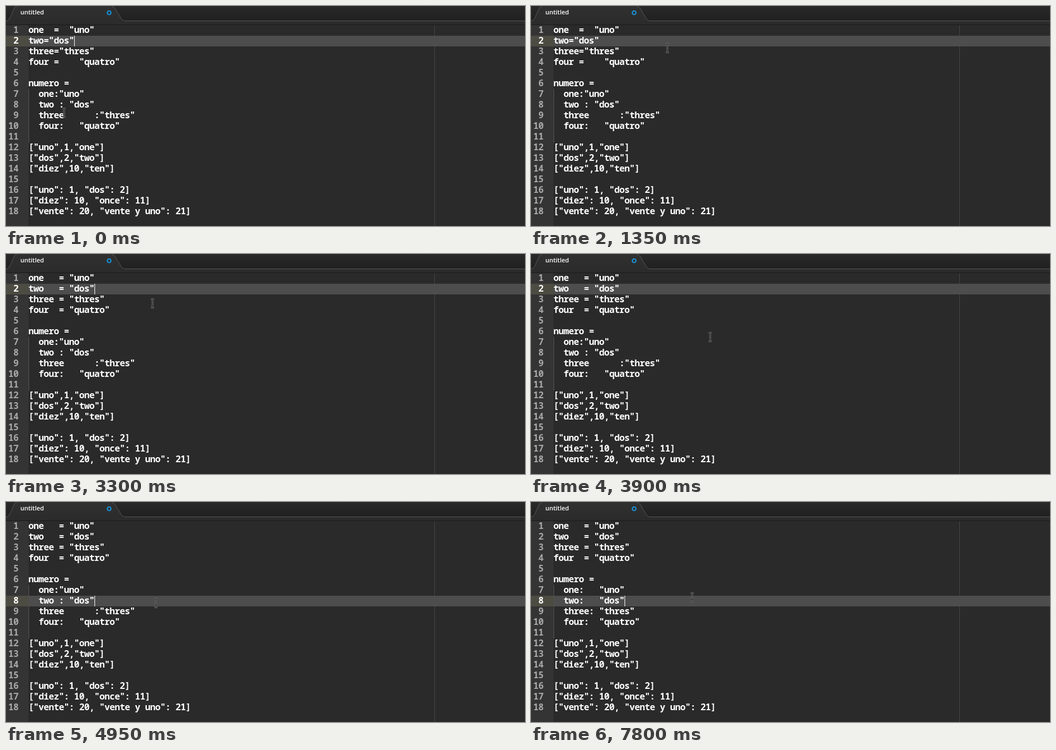
An HTML page for the animation above (8000 ms loop, 921 by 392 pixels).

```html
<!DOCTYPE html>
<html lang="en">
<head>
<meta charset="utf-8">
<title>Align editor</title>
<style>
  html, body { margin: 0; height: 100%; overflow: hidden; background: #2a2a2a; }
  svg { display: block; width: 921px; height: 392px; }
  text { font: 600 16px "Noto Sans Mono", "DejaVu Sans Mono", monospace; letter-spacing: -.6px; fill: #fff; white-space: pre; font-variant-ligatures: none; }
  .num { fill: #a8a8a8; text-anchor: end; }
  .num.on { fill: #fff; }
  .tab { font: 600 11px "Open Sans", "Lato", sans-serif; letter-spacing: 0; }
</style>
</head>
<body>
<svg viewBox="0 0 921 392">
  <defs>
    <linearGradient id="bar" x2="0" y2="1">
      <stop offset="0" stop-color="#292929"/><stop offset="1" stop-color="#202020"/>
    </linearGradient>
    <linearGradient id="face" x2="0" y2="1">
      <stop offset="0" stop-color="#303030"/><stop offset="1" stop-color="#2b2b2b"/>
    </linearGradient>
    <path id="beam" d="M-3 -7.5H-2Q0 -7.5 0 -5.5Q0 -7.5 2 -7.5H3M0 -5.5V5.5M-3 7.5H-2Q0 7.5 0 5.5Q0 7.5 2 7.5H3M-2 3.5H2"/>
  </defs>
  <rect width="921" height="27" fill="url(#bar)"/>
  <path d="M0 33V26.5H1Q5 26 7 21L14 5Q16 0 20 0H187Q191 0 194 5L203 20Q206 26.5 212 26.5H921V33Z" fill="url(#face)"/>
  <path d="M0 26.5H1Q5 26 7 21L14 5Q16 0 20 0M187 0Q191 0 194 5L203 20Q206 26.5 212 26.5H921" fill="none" stroke="#555"/>
  <text class="tab" x="25.5" y="15">untitled</text>
  <circle cx="183" cy="12" r="3.3" fill="none" stroke="#1593dd" stroke-width="2"/>
  <rect y="33" width="921" height="1" fill="#1b1b1b"/>
  <rect y="34" width="40" height="358" fill="#343434"/>
  <path d="M760.5 34V392" stroke="#454545"/>
  <path d="M40.5 148V243" stroke="#555"/>
  <g id="row"><rect width="40" height="19" fill="#4d4c42"/><rect x="40" width="881" height="19" fill="#4d4d4d"/></g>
  <g id="code"></g>
  <rect id="caret" width="1" height="19" fill="#f8f8f8"/>
  <g id="mouse" fill="none">
    <use href="#beam" stroke="#808080" stroke-width="2.6"/>
    <use href="#beam" stroke="#1c1c1c"/>
  </g>
</svg>
<script>
const LOOP = 8000, TICK = 150, FIRST = 34, LINE = 19, COL = 9, LEFT = 40;
const ALIGN_TOP = 2250, CLICK = 4950, ALIGN_LIST = 7800;
const $ = id => document.getElementById(id);

const messy = `one  =  "uno"
two="dos"
three="thres"
four =    "quatro"

numero =
  one:"uno"
  two : "dos"
  three      :"thres"
  four:   "quatro"

["uno",1,"one"]
["dos",2,"two"]
["diez",10,"ten"]

["uno": 1, "dos": 2]
["diez": 10, "once": 11]
["vente": 20, "vente y uno": 21]`.split("\n");

// Pads the keys so that the values of a block share one column.
const align = (lines, from, sep) => lines.map((line, i) => {
  if (i < from || i > from + 3) return line;
  const [key, value] = line.split(sep).map(s => s.trim());
  return sep === "=" ? key.padEnd(6) + "= " + value
                     : "  " + (key + ":").padEnd(7) + value;
});
const half = align(messy, 0, "=");
const tidy = align(half, 6, ":");

// Pointer sweeps: each bends from the last resting place past a control point.
const rest = [103, 190];
const sweeps = [
  { from: 0, to: 450, bend: [240, 100], end: [193, 110] },
  { from: 900, to: 1950, bend: [267, 47], end: [260, 88] },
  { from: 3300, to: 4050, bend: [360, 100], end: [300, 176] },
  { from: 4350, to: 4800, bend: [276, 180], end: [266, 180] },
  { from: 5400, to: 6300, bend: [284, 158], end: [286, 170] }
];

function pointer(t) {
  return sweeps.reduce((pos, s) => {
    const u = Math.min(1, Math.max(0, (t - s.from) / (s.to - s.from))), v = 1 - u;
    return pos.map((p, i) => v * v * p + 2 * u * v * s.bend[i] + u * u * s.end[i]);
  }, rest).map(Math.round);
}

// The caret stays lit after each edit or click, then blinks.
function caretOn(t) {
  const since = t - [ALIGN_LIST, CLICK, ALIGN_TOP, -300].find(e => e <= t);
  const phase = since % 750;
  return since < 600 || phase >= 300 && phase < 600;
}

function add(x, y, cls) {
  const el = document.createElementNS("http://www.w3.org/2000/svg", "text");
  el.setAttribute("x", x);
  el.setAttribute("y", y);
  el.setAttribute("class", cls);
  return $("code").appendChild(el);
}
const rows = messy.map((_, i) => {
  const y = FIRST + i * LINE + 14;
  const num = add(22, y, "num");
  num.textContent = i + 1;
  return { num, text: add(LEFT - 0.3, y, "") };
});

function draw(time) {
  const t = Math.floor(time % LOOP / TICK) * TICK;
  const lines = t < ALIGN_TOP ? messy : t < ALIGN_LIST ? half : tidy;
  const active = t < CLICK ? 1 : 7;
  const top = FIRST + active * LINE;
  rows.forEach(({ num, text }, i) => {
    if (text.textContent !== lines[i]) text.textContent = lines[i];
    num.setAttribute("class", i === active ? "num on" : "num");
  });
  $("row").setAttribute("transform", `translate(0 ${top})`);
  $("caret").setAttribute("x", LEFT + lines[active].length * COL);
  $("caret").setAttribute("y", top);
  $("caret").setAttribute("opacity", +caretOn(t));
  $("mouse").setAttribute("transform", `translate(${pointer(t)})`);
}

const start = performance.now();
function frame() {
  draw(performance.now() - start);
  requestAnimationFrame(frame);
}
frame();
</script>
</body>
</html>
```
